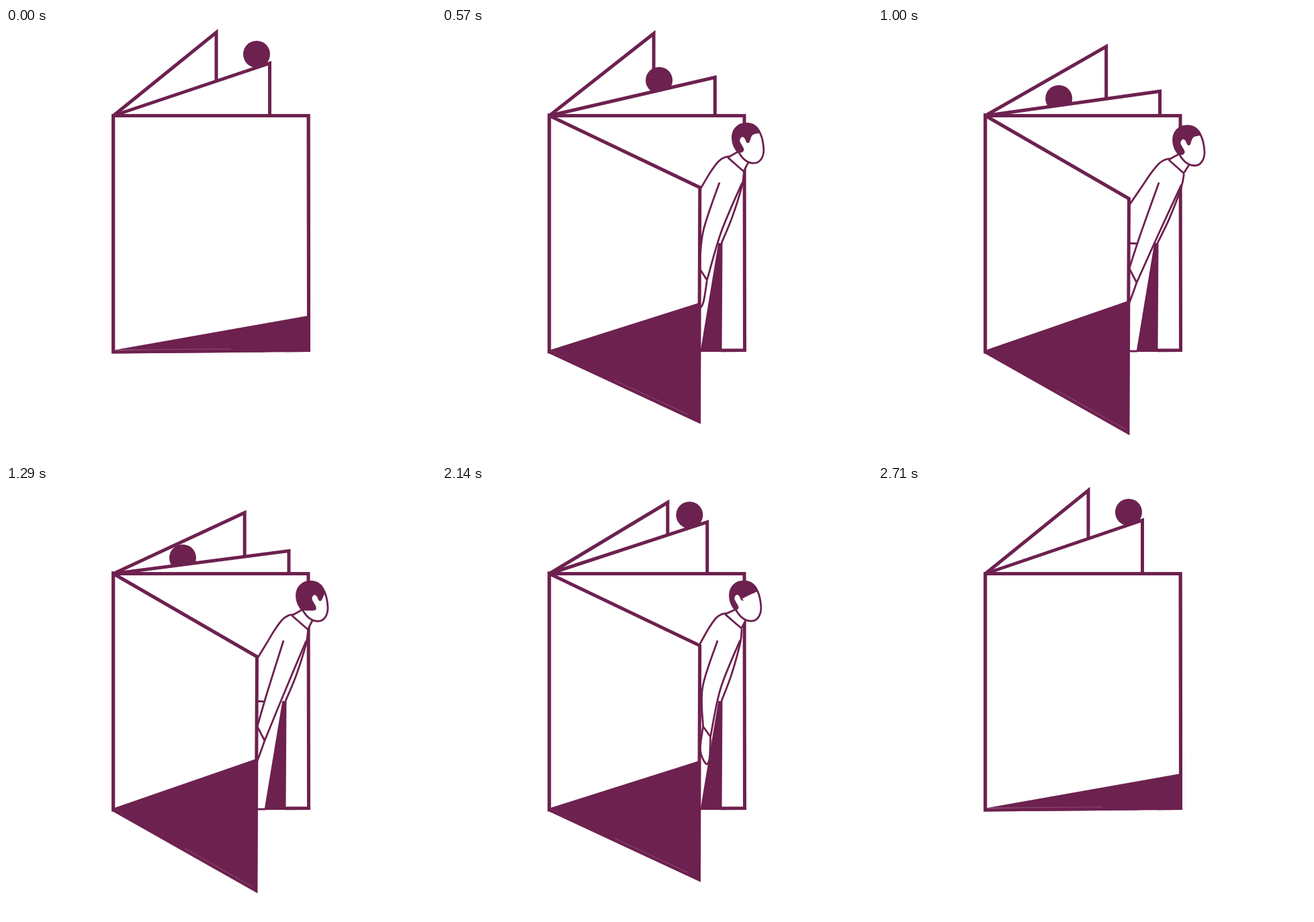
Write an HTML page with a canvas that moves like this. It is 640 px wide and 640 px high and loops after 2.87 s.

```html
<!DOCTYPE html>
<html lang="en">
<head>
<meta charset="utf-8">
<title>Open door</title>
<style>
html, body { margin: 0; width: 100%; height: 100%; overflow: hidden; background: #fff; }
canvas { display: block; width: 100vw; height: 100vh; }
</style>
</head>
<body>
<canvas id="stage" width="640" height="640"></canvas>
<script>
const ctx = document.getElementById('stage').getContext('2d');
const INK = '#6d214f', LOOP = 2870, FPS = 14, LAST_STEP = 38;
const THICK = 5, THIN = 2.8;
const HINGE = [159.8, 130.5], FOOT = [159.8, 482];

const lerp = (a, b, k) => a + (b - a) * k;
const mix = (p, q, k) => p.map((v, i) => lerp(v, q[i], k));
const clamp = (v, lo, hi) => Math.min(hi, Math.max(lo, v));
const ease = (s, from, to) => (1 - Math.cos(Math.PI * clamp((s - from) / (to - from), 0, 1))) / 2;

function line(path, ...points) {
  points.forEach(p => path.lineTo(...p));
  return path;
}

// Smooth curve through all the points
function curve(path, ...points) {
  path.lineTo(...points[0]);
  for (let i = 0; i < points.length - 1; i++) {
    const a = points[Math.max(0, i - 1)], b = points[i];
    const c = points[i + 1], d = points[Math.min(points.length - 1, i + 2)];
    path.bezierCurveTo(
      b[0] + (c[0] - a[0]) / 6, b[1] + (c[1] - a[1]) / 6,
      c[0] - (d[0] - b[0]) / 6, c[1] - (d[1] - b[1]) / 6, ...c);
  }
  return path;
}

function fill(path, color = '#fff') {
  ctx.fillStyle = color;
  ctx.fill(path);
}

function stroke(path, width) {
  ctx.strokeStyle = INK;
  ctx.lineWidth = width;
  ctx.stroke(path);
}

function paper(path, width) {
  fill(path);
  stroke(path, width);
}

const thinLine = (...points) => stroke(line(new Path2D(), ...points), THIN);
const thinCurve = points => stroke(curve(new Path2D(), ...points), THIN);

function drawPage(tip) {
  paper(line(new Path2D(), HINGE, tip, [tip[0], 131]), THICK);
}

function drawBackPages(s) {
  const far = ease(s, 6, 20.3) - ease(s, 25.3, 34.8);
  const near = ease(s, 0, 16.4) - ease(s, 18.5, 32);
  drawPage(mix([313, 6.5], [358, 42], far));

  const roll = near ** 1.08;
  const ball = new Path2D();
  ball.arc(373 - 110 * roll, 39 + 68 * roll * (1.48 - 0.48 * roll), 20, 0, 2 * Math.PI);
  fill(ball, INK);

  const rest = mix([392.5, 52.5], [393.5, 51], s / LAST_STEP);
  drawPage(mix(rest, [421, 96.5], near));
  const cover = line(new Path2D(), HINGE, [450, 130.5], [450.5, 479.5], FOOT);
  cover.closePath();
  paper(cover, THICK);
}

function drawLegs() {
  fill(line(new Path2D(), [350, 320], [416, 320], [416, 483], [350, 483]));
  thinLine([350, 481], [386, 481]);
  fill(line(new Path2D(), [411.5, 319], [417.5, 319], [416.5, 482], [384.5, 482]), INK);
}

function drawTorso(at) {
  const back = [at(350, 296), at(386, 238), at(400, 215), at(412, 199), at(421, 193), at(429, 191.5)];
  const chest = [at(450, 214), at(447, 235), at(432, 282), [416, 320]];
  fill(line(curve(curve(new Path2D(), ...back), ...chest), [350, 320]));
  thinCurve(back);
  thinCurve(chest);
  thinLine([350, 319], [386, 321]);
}

function drawArm(lean, cuffX, at) {
  const shoulder = [413.5 + 0.85 * lean, 230];
  const elbow = [389 + 0.3 * lean, 300 + (388 - cuffX) * 0.5];
  const cuff = [cuffX, 358];
  const wrist = [cuffX + 11, 379 - (cuffX - 374) * 0.4];
  const armpit = at(447, 231);
  const middle = mix(armpit, wrist, 0.5);
  middle[0] -= (cuffX - 373) * 0.45;

  const tilt = -2 + (cuffX - 388) * 0.75;
  const palm = [wrist[0] + tilt, wrist[1] + 33];
  const fingertip = [palm[0] - 5 + tilt * 0.3, palm[1] + 7];
  paper(curve(new Path2D(), wrist, palm, fingertip, [cuffX - 3 + tilt * 0.7, 393], cuff), THIN);

  const rear = [shoulder, elbow, cuff], front = [wrist, middle, armpit];
  fill(curve(curve(new Path2D(), ...rear), ...front));
  thinCurve(rear);
  thinLine(cuff, wrist);
  thinCurve(front);
}

// The hairline slides over the face as the head turns; the fringe flattens with age of the turn
function drawHead(slide, flat) {
  const egg = new Path2D(`M453 142C440 142 432 151 432 163C432 173 437 181 442 186
    C448 196 456 201 464 201C473 201 478.5 192 478.5 181C478 171 476 162 473 156
    C469 147 462 142 453 142Z`);
  const move = (x, y) => [x + slide, y];
  const hairline = [
    [475, 156], move(462 - 6 * flat, 159 + 8 * flat), move(457, 170), move(453, 170),
    move(450, 164), move(446, 162), move(443, 168), move(449, 180), move(446, 185), [441, 185]
  ];
  fill(egg);
  ctx.save();
  ctx.clip(egg);
  fill(line(curve(new Path2D(), ...hairline), [425, 186], [425, 135], [482, 135]), INK);
  ctx.restore();
  stroke(egg, THIN);
}

function drawPerson(s) {
  const out = ease(s, 0, 10.4) - ease(s, 26.8, 37.8);
  const glance = ease(s, 14, 18) - ease(s, 18.5, 26);
  const shift = 7.5 - 57 * (1 - out) - 7 * glance;
  const drop = 0.5 * Math.max(shift, 0);
  const lean = 0.85 * shift - 0.9;
  const cuffX = Math.min(392, 374 + 75 * (1 - out));

  // Upper body bends about the waist, most at the collar
  const at = (x, y) => {
    const k = (320 - y) / 107;
    return [x + lean * k, y + 0.45 * Math.max(lean, -5) * k];
  };
  const onHead = (x, y) => [x + shift, y + drop];

  drawLegs();
  drawTorso(at);
  const nape = [onHead(440, 184), at(428, 192)];
  const throat = [at(450, 213), onHead(456, 199)];
  fill(line(new Path2D(), ...nape, ...throat));
  thinLine(...nape);
  thinLine(...throat);
  thinLine(at(426, 193), at(450, 214));
  drawArm(lean, cuffX, at);
  ctx.save();
  ctx.translate(shift, drop);
  drawHead(12 * glance - 4 * ease(s, 24, 30), ease(s, 18, 24));
  ctx.restore();
}

function drawDoor(s) {
  const open = ease(s, 1, 10.2) - ease(s, 27.5, 38);
  const top = mix([450, 130.5], [373.5, 254], open);
  const bottom = mix([450.5, 479.5], [372, 602], open);
  const shade = mix([448, 428.5], [372.5, 406], open);
  const door = line(new Path2D(), HINGE, top, bottom, FOOT);
  door.closePath();
  fill(door);
  fill(line(new Path2D(), [160, 479.5], shade, bottom), INK);
  stroke(door, THICK);

  // Hairline seam between the shaded part and the lower edge
  const seam = k => {
    const [x, y] = mix(FOOT, bottom, k);
    return [x, y - 2.8];
  };
  ctx.strokeStyle = 'rgba(255,255,255,.35)';
  ctx.lineWidth = 0.6;
  ctx.stroke(line(new Path2D(), seam(lerp(0.02, 0.5, open)), seam(lerp(0.6, 0.98, open))));
}

function frame(time) {
  const s = Math.min(LAST_STEP, Math.floor((time % LOOP + 5) * FPS / 1000));
  ctx.fillStyle = '#fff';
  ctx.fillRect(0, 0, 640, 640);
  drawBackPages(s);
  drawPerson(s);
  drawDoor(s);
}

const start = performance.now();
function tick() {
  frame(performance.now() - start);
  requestAnimationFrame(tick);
}
tick();
</script>
</body>
</html>
```
